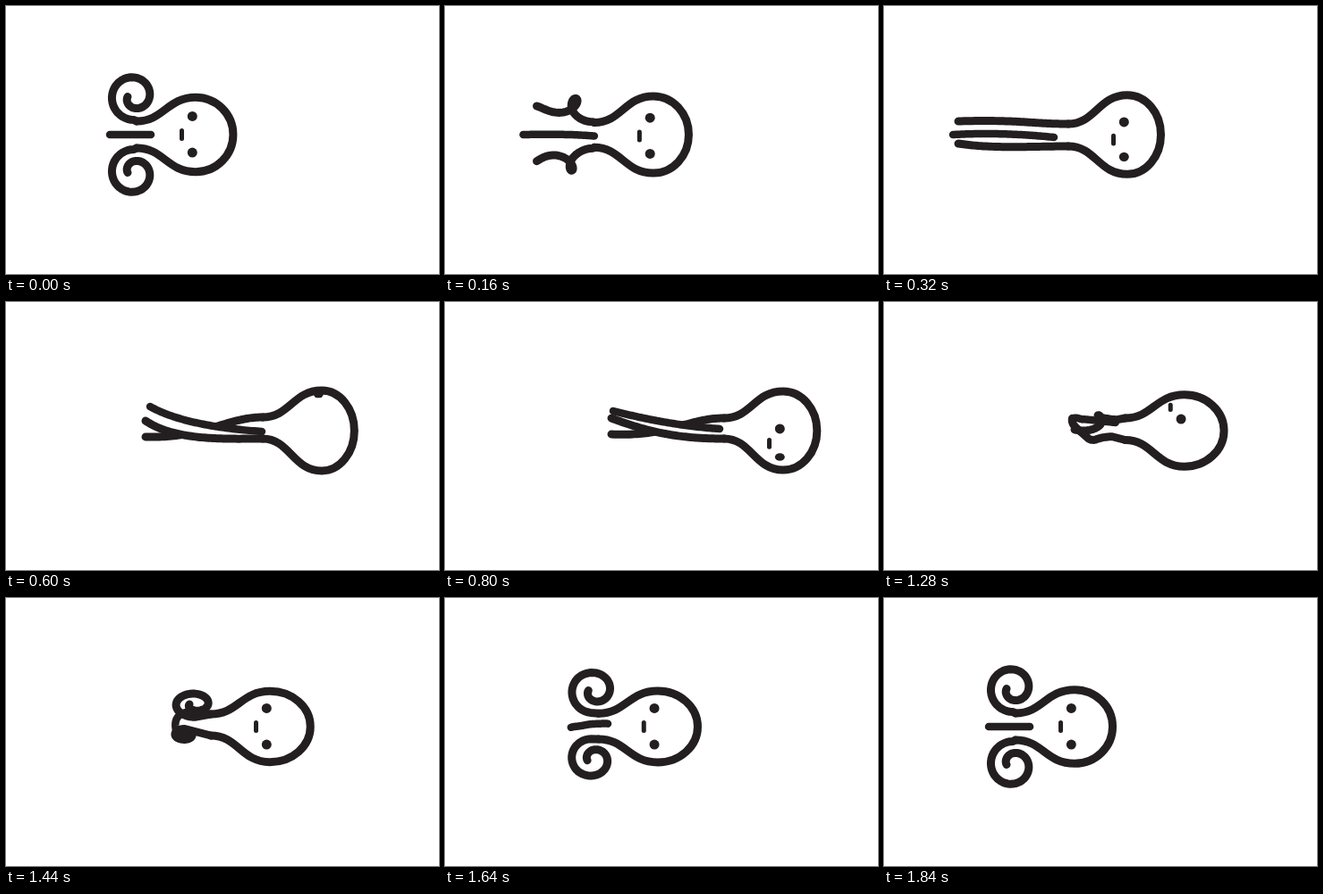
These frames come from a looping animation (484x300 px, 1.88 s). An HTML page with a canvas:

```html
<!DOCTYPE html>
<html>
<head>
<meta charset="utf-8">
<style>
html, body { margin: 0; width: 100%; height: 100%; overflow: hidden; background: #fff; }
canvas { display: block; }
</style>
</head>
<body>
<canvas id="stage" width="484" height="300"></canvas>
<script>
const ctx = document.getElementById('stage').getContext('2d');
const INK = '#231f20', LOOP = 1880, STEP = 40, MID = 144, SHOULDER = -66, N = 60;

// Monotone cubic through [time, value] keys, flat at both ends.
function ease(keys, t) {
  const last = keys.length - 1;
  const rate = i => (keys[i + 1][1] - keys[i][1]) / (keys[i + 1][0] - keys[i][0]);
  const slope = i => {
    if (i === 0 || i === last) return 0;
    const a = rate(i - 1), b = rate(i);
    return a * b <= 0 ? 0 : 2 * a * b / (a + b);
  };
  let i = 0;
  while (i < last - 1 && t >= keys[i + 1][0]) i++;
  const [t0, v0] = keys[i], [t1, v1] = keys[i + 1];
  const h = t1 - t0, u = (t - t0) / h, w = 1 - u;
  return v0 * (1 + 2 * u) * w * w + slope(i) * h * u * w * w +
    v1 * u * u * (3 - 2 * u) - slope(i + 1) * h * u * u * w;
}

function bezier(p, u) {
  while (p.length > 1) {
    p = p.slice(1).map((b, i) => b.map((v, k) => p[i][k] + (v - p[i][k]) * u));
  }
  return p[0];
}

const samples = f => Array.from({ length: N + 1 }, (_, i) => f(i / N));

// Arm shapes; x counts from the centre of the head.
const reach = (hip, control, tip) =>
  samples(u => bezier([[SHOULDER, hip], [SHOULDER - 40, hip], control, tip], u));
const bar = (...points) => samples(u => bezier(points, u));
const coil = (x, y, sx, sy) => samples(u => {
  const a = Math.PI * (0.5 + 2.5 * u), r = 26 - 19 * u ** 1.6;
  return [x + sx * r * Math.cos(a), y + sy * r * Math.sin(a)];
});

const rest = {
  hips: [129, 159],
  top: coil(-69, 101.5, 1, 1),
  mid: bar([-50, MID], [-96, MID]),
  low: coil(-69, 2 * MID - 101.5, 1, -1)
};
const poses = [
  [0, rest],
  [320, {
    hips: [132, 157],
    top: reach(132, [-122, 127], [-189, 129]),
    mid: bar([-82, 147], [-140, 141], [-195, MID]),
    low: reach(157, [-150, 160], [-189, 154])
  }],
  [600, {
    hips: [129, 153],
    top: reach(129, [-133, 153], [-197, 151]),
    mid: bar([-67, 145], [-153, 139], [-192, 117]),
    low: reach(153, [-163, 156], [-197, 133])
  }],
  [800, {
    hips: [130, 153],
    top: reach(130, [-128, 151], [-192, 148]),
    mid: bar([-71, 142], [-128, 138], [-190, 122]),
    low: reach(153, [-143, 149], [-192, 130])
  }],
  [1120, {
    hips: [130, 155],
    top: reach(130, [-111, 160], [-160, 160]),
    mid: bar([-74, 143], [-134, 135], [-149, 114]),
    low: reach(155, [-148, 150], [-155, 117])
  }],
  [1440, {
    hips: [130, 154],
    top: coil(-84, 119, 0.85, 0.55),
    mid: bar([-79, 127], [-110, 125], [-105, 148]),
    low: coil(-95, 153, 0.45, -0.25)
  }],
  [1720, rest],
  [LOOP, rest]
];

const path = [[0, 212], [320, 272], [600, 353], [800, 378], [920, 381],
  [1120, 366], [1440, 295], [1680, 230.5], [LOOP, 212]];
const spin = [[0, 0], [320, 14], [600, 232], [800, 398], [1120, 545], [1440, 720], [LOOP, 720]];

const blend = (get, t) => ease(poses.map(([time, pose]) => [time, get(pose)]), t);
const arm = (name, t, cx) => rest[name].map((_, i) => [
  cx + blend(p => p[name][i][0], t),
  blend(p => p[name][i][1], t)
]);

function follow(points) {
  for (const [x, y] of points) ctx.lineTo(x, y);
}

function stroke(points, width) {
  ctx.lineWidth = width;
  ctx.beginPath();
  follow(points);
  ctx.stroke();
}

function drawHead(cx, rx, ry, hips) {
  const x = cx + SHOULDER, top = MID - ry, low = MID + ry;
  ctx.lineWidth = 9;
  ctx.beginPath();
  ctx.moveTo(x, hips[0]);
  ctx.bezierCurveTo(cx - 36, hips[0], cx - 32, top, cx, top);
  ctx.ellipse(cx, MID, rx, ry, 0, -Math.PI / 2, Math.PI / 2);
  ctx.bezierCurveTo(cx - 32, low, cx - 36, hips[1], x, hips[1]);
  ctx.stroke();
}

// Height on the rolling head, or null on its far side.
function roll(deg) {
  const a = deg * Math.PI / 180, s = Math.sin(a), c = Math.cos(a);
  return c < -0.01 ? null : { y: 30 * s - (s < 0 ? 11 * s ** 8 : 0), c };
}

function drawFace(cx, deg) {
  ctx.fillStyle = INK;
  for (const side of [-42, 42]) {
    const eye = roll(deg + side);
    if (!eye) continue;
    ctx.beginPath();
    ctx.ellipse(cx - 3.7, MID + eye.y, 5.5, Math.min(5.5, 3.9 + 2.2 * eye.c), 0, 0, 7);
    ctx.fill();
  }
  const mouth = roll(deg);
  if (!mouth) return;
  const x = cx - 15.5, y = MID + 0.78 * mouth.y, h = 1.5 + 3 * mouth.c;
  stroke([[x, y - h], [x, y + h]], 5);
}

function draw(t) {
  const cx = ease(path, t);
  const swell = Math.sin(2 * Math.PI * t / LOOP - 0.25);
  const hips = [0, 1].map(i => blend(p => p.hips[i], t));
  const [top, mid, low] = ['top', 'mid', 'low'].map(name => arm(name, t, cx));
  top.unshift([cx + SHOULDER, hips[0]]);
  low.unshift([cx + SHOULDER, hips[1]]);

  ctx.fillStyle = '#fff';
  ctx.fillRect(0, 0, 484, 300);
  ctx.strokeStyle = INK;
  ctx.lineCap = ctx.lineJoin = 'round';

  stroke(top, 9);
  // While the arms are twisted, the front pair hides the rear one.
  if (t > 320 && t < 1280) {
    ctx.beginPath();
    follow(mid);
    follow(low.slice().reverse());
    ctx.fill();
  }
  stroke(low, 9);
  stroke(mid, 8.5);
  drawHead(cx, 40.8 - 4.5 * swell, 42.3 + 2.7 * swell, hips);
  drawFace(cx, ease(spin, t));
}

const start = performance.now();
function tick() {
  const t = (performance.now() - start) % LOOP;
  draw(Math.floor(t / STEP) * STEP);
  requestAnimationFrame(tick);
}
tick();
</script>
</body>
</html>
```
